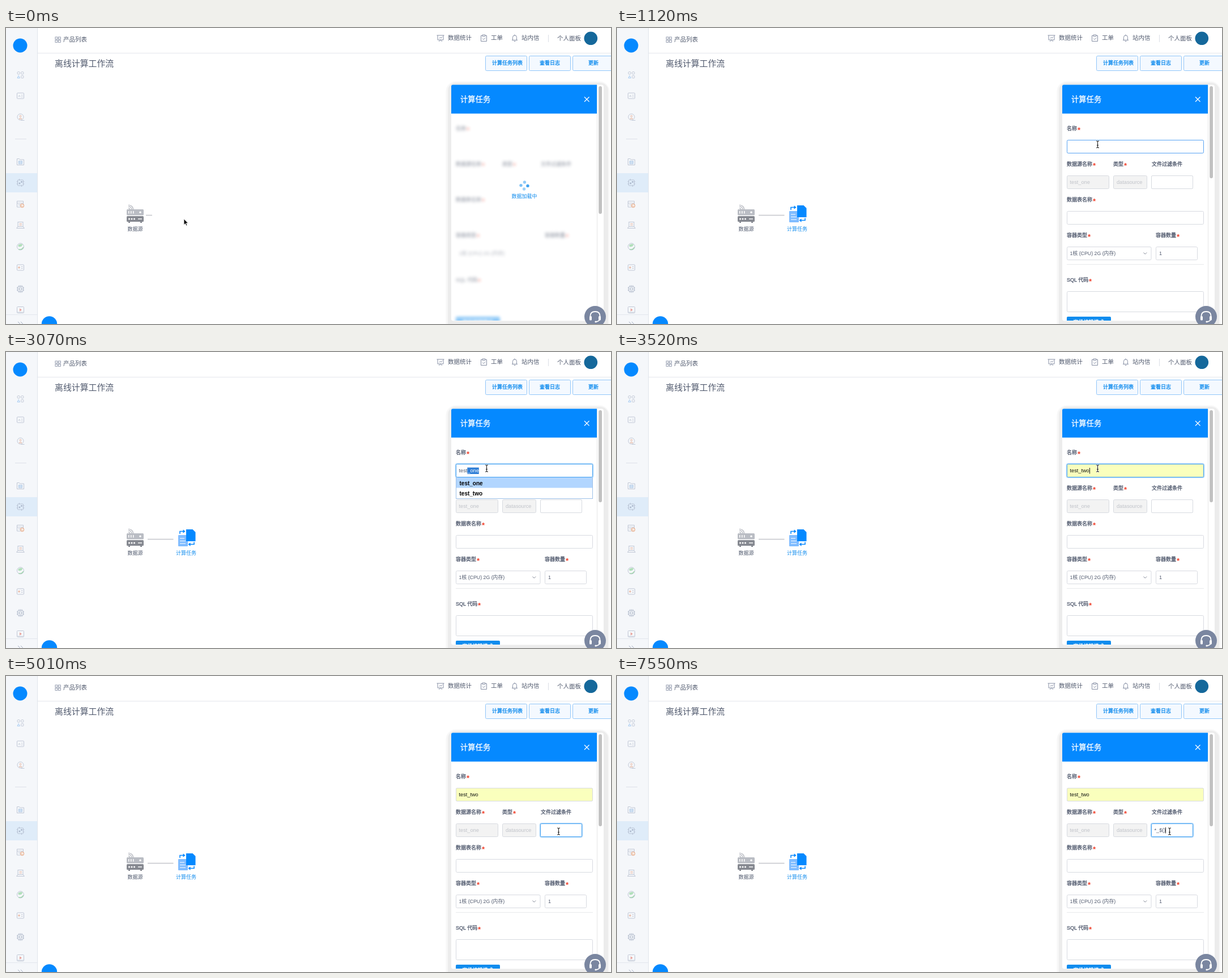
These frames come from a looping animation (1068x524 px, 8000 ms). An HTML page:

```html
<!DOCTYPE html>
<html lang="zh-CN">
<head>
<meta charset="utf-8">
<title>离线计算工作流</title>
<style>
html, body { margin: 0; width: 100%; height: 100%; overflow: hidden; background: #fff; }
svg { display: block; width: 1068px; height: 524px; }
text { font-family: 'Liberation Sans', 'Noto Sans CJK SC', 'Noto Sans CJK', sans-serif; white-space: pre; }
</style>
</head>
<body>
<svg id="stage" viewBox="0 0 1068 524"></svg>
<script>
const LOOP = 8000;
const BLUE = '#0589ff', GREY = '#a4aec2', INK = '#515a6e';

// Drawing helpers; text is placed by its left edge and vertical centre.
const rect = (x, y, w, h, fill, more = '') =>
  `<rect x="${x}" y="${y}" width="${w}" height="${h}" fill="${fill}" ${more}/>`;
const circle = (x, y, r, fill, more = '') =>
  `<circle cx="${x}" cy="${y}" r="${r}" fill="${fill}" ${more}/>`;
const line = (d, color = GREY, w = 1, more = '') =>
  `<path d="${d}" fill="none" stroke="${color}" stroke-width="${w}" ${more}/>`;
const text = (x, cy, size, str, fill = INK, more = '') =>
  `<text x="${x}" y="${cy + size * .37}" font-size="${size}" fill="${fill}" ${more}>${str}</text>`;
// A hairline outline gives the medium weight.
const medium = (x, cy, size, str, fill = INK) =>
  text(x, cy, size, str, fill, `stroke="${fill}" stroke-width=".3"`);
const group = (id, body, more = '') => `<g id="${id}" ${more}>${body}</g>`;
const at = (x, y, body) => `<g transform="translate(${x} ${y})">${body}</g>`;

const field = (x, y, w, h, fill = '#fff') =>
  rect(x + .5, y + .5, w - 1, h - 1, fill, 'rx="2" stroke="#d7dae0"');

function label(x, cy, str, width, required = true) {
  const star = `<text x="${x + width + 1}" y="${cy + 7.4}" font-size="13" font-weight="700" fill="#f0402c">*</text>`;
  return medium(x, cy, 9, str) + (required ? star : '');
}

function sidebar() {
  const box = (w, h, c = GREY) => rect(-w / 2, -h / 2, w, h, 'none', `rx="1" stroke="${c}"`);
  const icons = [
    [83, circle(-3.3, -3.3, 2.3, 'none', `stroke="${GREY}"`) + circle(3.3, -3.3, 2.3, 'none', `stroke="${GREY}"`) +
      line('M-5.5 5.5L-3.3 1.3L-1 5.5Z', '#7db4ee') + rect(1.2, 1.4, 4.2, 4.2, 'none', `rx="1" stroke="${GREY}"`)],
    [120, box(12, 10) + line('M-3.5 2L-2 -1L-.5 2M1.5 -1H4M1.5 2H4', GREY, .9)],
    [158, circle(0, -.5, 5.5, 'none', `stroke="${GREY}"`) + circle(0, -2, 1.4, 'none', 'stroke="#e39a7a"') +
      line('M-2.5 3Q0 -1 2.5 3Z', '#e39a7a') + line('M1 5.5H7')],
    [237, line('M-6 5.5V-5.5H-2L-1 -4H6V5.5Z') + rect(-3, -1.5, 6, 5, '#cfe2f6', 'stroke="#7fa9d6" stroke-width=".8"') + line('M-3 1H3', '#7fa9d6', .8)],
    [274, box(10, 10) + line('M-7 -2H-4M-7 2H-4M4 -2H7M4 2H7M-2 -7V-4M2 4V7') + circle(-1.5, 1, 1.4, '#8e9ab2') + circle(2, -1.5, 1.4, '#8e9ab2')],
    [312, line('M-6 -5.5H5V0M-6 -5.5V5H0M-6 -2H5M-4 1H0') + circle(3, 2.5, 3.3, '#f1c3a5', 'stroke="#e08c5e"') + line('M3 0V2.5H5.5', '#fff')],
    [349, rect(-4.5, -5.5, 9, 8, 'none', `stroke="${GREY}"`) + line('M-7 5.5H7M-5 2.5L-6.5 5.5M5 2.5L6.5 5.5') + line('M-2 -2.5H2.5M-2 0H2.5', '#e39a7a')],
    [387, circle(0, 0, 6, 'none', `stroke="${GREY}"`) + '<path d="M-4 -3Q0 -6 4 -4Q2 1 -1 0Q-4 2 -4 -3Z" fill="#8fd39b"/>' + line('M-3 5Q3 6 5 1', '#62bd73', 1.3)],
    [424, box(12, 10) + circle(-2.5, 0, 1.7, '#e39a7a') + line('M1.5 -1.5H4M1.5 1.5H4')],
    [462, box(9, 9, '#8e9ab2') + rect(-2, -2, 4, 4, 'none', 'stroke="#8e9ab2"') +
      line('M-2.5 -6.5V-4.5M0 -6.5V-4.5M2.5 -6.5V-4.5M-2.5 4.5V6.5M0 4.5V6.5M2.5 4.5V6.5M-6.5 -2.5H-4.5M-6.5 0H-4.5M-6.5 2.5H-4.5M4.5 -2.5H6.5M4.5 0H6.5M4.5 2.5H6.5', '#8e9ab2')],
    [499, box(12, 11) + '<path d="M-1.5 -2.7L2.5 0L-1.5 2.7Z" fill="#e4776b"/>' + line('M-6 4H6', GREY, .7)]
  ];
  return rect(0, 0, 55, 524, '#f5f7fa') + rect(0, 257, 55, 34, '#dfecf9') + rect(55, 0, 1, 524, '#e1e5ec') +
    circle(25, 31, 12.5, BLUE) + rect(16, 196, 20, 1, '#dde1e8') +
    group('icons', icons.map(([y, body]) => at(25.5, y, body)).join(''), 'opacity=".65"') +
    rect(0, 506, 55, 18, '#f5f7fa') + rect(0, 507, 55, 1, '#e3e7ed') +
    line('M21 520L24.5 523.5L21 527M26 520L29.5 523.5L26 527');
}

function header() {
  const c = '#8790a5', squares = [[87, 16], [92.5, 16], [87, 21.5], [92.5, 21.5]];
  const button = (x, tx, str) => rect(x + .5, 49.5, 73, 26, '#f4f9ff', 'rx="2" stroke="#91c6f9"') +
    medium(tx, 62, 9, str, '#108cee');
  return rect(56, 44, 1012, 1, '#e4e7ec') +
    squares.map(([x, y]) => rect(x, y, 3.8, 3.8, 'none', `stroke="${c}" stroke-width=".9"`)).join('') +
    text(101, 20.5, 10.5, '产品列表') +
    line('M760.5 13H773.5M762 13V21H772V13M764 24L767 21L770 24M764.5 18.5L766.5 16.5L768 18L770 15.5', c) +
    text(780, 17.5, 10.5, '数据统计') +
    line('M841 13.5H838.5V23.5H848.5V13.5H846M841 12H846V14.5H841ZM841 18.5L843 20.5L846.5 17', c) +
    text(856, 17.5, 10.5, '工单') +
    line('M893 21.5H903M894.5 21.5V16.5Q894.5 13 898 13T901.5 16.5V21.5M898 11.5V13M896.5 23.5H899.5', c) +
    text(910, 17.5, 10.5, '站内信') + rect(957, 12, 1, 13, '#dcdfe6') +
    text(973, 18.5, 10.5, '个人面板') + circle(1032.3, 18.3, 11.8, '#15689b') +
    text(86, 62, 14.9, '离线计算工作流') +
    button(846, 858, '计算任务列表') + button(923, 942, '查看日志') + button(1000, 1028, '更新');
}

function nodes() {
  const dark = '#868991', pale = '#babdc4';
  const source = line('M216 319Q219 319 219 322M216 316Q222 316.5 222 322M216 313.5Q224 314 224.5 321', '#a3a7b0', 1.1) +
    rect(213, 321, 30, 10.5, pale, 'rx="1.5"') + rect(213, 333, 30, 10, dark, 'rx="1.5"') +
    rect(216, 343, 3, 2, dark) + rect(237, 343, 3, 2, dark) +
    [216, 220, 224].map(x => rect(x, 324, 1.5, 4.5, '#fff')).join('') + circle(237, 326.3, 1.7, '#fff') +
    [217.5, 222, 226.5].map(x => circle(x, 338, 1.5, '#fff')).join('') + rect(233, 337.3, 7, 1.4, '#fff') +
    text(214.5, 356, 9, '数据源');
  const task = rect(304, 324, 17, 20, '#80bcff', 'rx="1"') + line('M307 330H315M307 334.5H317M307 339H317', '#fff', 1.2) +
    `<path d="M318 314H329.5L334.5 319V335H318Z" fill="${BLUE}"/>` +
    line('M307 322V317.5H314M332 336.5V340.5H324', BLUE, 1.6) +
    `<path d="M312.5 314.3L316.5 317.5L312.5 320.7ZM325.5 337.3L321.5 340.5L325.5 343.7Z" fill="${BLUE}"/>` +
    text(300, 356, 9, '计算任务', '#108cee');
  return source + line('', '#c3c5ca', 1.5, 'id="link"') + group('task', task);
}

function panel() {
  const labels = label(794, 178, '名称', 18) + label(794, 241, '数据源名称', 45) + label(876, 241, '类型', 18) +
    label(944, 241, '文件过滤条件', 54, false) + label(794, 304, '数据表名称', 45) + label(794, 367, '容器类型', 36) +
    label(951, 367, '容器数量', 36) + label(794, 446, 'SQL 代码', 38) +
    text(799.5, 398.5, 8.8, '1核 (CPU) 2G (内存)') +
    rect(794, 511, 78, 20, '#108cee', 'rx="2"') + medium(805.5, 520.5, 9, '高级编辑模式', '#fff');
  const fields = field(794, 198, 242, 24) + field(794, 261, 75, 24, '#f3f3f3') + field(876, 261, 60, 24, '#f3f3f3') +
    field(943, 261, 74, 24) + field(794, 324, 242, 24) + field(794, 387, 149.5, 24) + field(951, 387, 74, 24) +
    field(794, 466, 242, 37) + rect(794, 418, 242, 1, '#e8eaec') +
    text(799.5, 273, 9.2, 'test_one', '#c0c3c9') + text(882, 273, 9.2, 'datasource', '#c0c3c9') +
    text(957, 398.5, 9.2, '1') + line('M929.5 397.5L932.3 400.3L935.1 397.5', '#808695');
  const spinner = group('dots', [.45, .8, .4, .55].map((o, i) => {
    const a = i * Math.PI / 2 - 1.5;
    return circle(6 * Math.cos(a), 6 * Math.sin(a), 2.7, '#108cee', `opacity="${o}"`);
  }).join('')) + text(892.5, 297.5, 9, '数据加载中', '#108cee');

  return rect(776.5, 94.5, 289, 450, '#f7f7f7', 'rx="18"') + rect(780, 97, 283, 440, '#ececec', 'rx="14"') +
    rect(786, 100.5, 269, 418, '#fff', 'rx="4"') + rect(1043, 101, 1, 417, '#e6e6e6') +
    `<path d="M786 151.5V103.5Q786 100.5 789 100.5H1043V151.5Z" fill="${BLUE}"/>` +
    medium(802, 126.5, 13.3, '计算任务', '#fff') +
    line('M1021 122L1029.5 130.5M1029.5 122L1021 130.5', '#fff', 1.2) +
    rect(1046.2, 103, 5.8, 163, '#c1c1c1', 'id="thumb" rx="2.9"') +
    `<g clip-path="url(#body)">${group('fields', fields)}${group('labels', labels)}</g>` +
    group('live', '') + group('spin', spinner);
}

function support() {
  return circle(76.5, 524, 13.7, BLUE) + circle(1040, 511, 19, '#7a86a0') +
    line('M1031.5 514V510Q1031.5 502 1040 502T1048.5 510V514Q1048 519 1042 520', '#fff', 1.8) +
    rect(1030, 510, 4, 7.5, '#fff', 'rx="1.5"') + rect(1046, 510, 4, 7.5, '#fff', 'rx="1.5"') +
    circle(1041, 520, 1.6, '#fff');
}

const pointers =
  '<path id="arrow" d="M0 0V10.5L2.5 8.2L4.2 12L5.9 11.2L4.2 7.6H7.5Z" fill="#111" stroke="#fff" stroke-width=".7"/>' +
  group('beam', ['#fff', '#222'].map((c, i) =>
    line('M-2.5 -6Q0 -6 0 -4.5Q0 -6 2.5 -6M0 -4.5V4.5M-2.5 6Q0 6 0 4.5Q0 6 2.5 6M-1.5 1.5H1.5', c, i ? 1.1 : 2.4)).join(''));

const stage = document.getElementById('stage');
stage.innerHTML = `<defs><clipPath id="body">${rect(786, 152, 257, 366, '#000')}</clipPath></defs>` +
  rect(0, 0, 1068, 524, '#fff') + sidebar() + header() + nodes() + panel() + support() + group('pointer', pointers);
const $ = id => document.getElementById(id);
const show = (id, on) => $(id).setAttribute('display', on ? 'inline' : 'none');

// Advance widths in ems, so carets and selections follow the type.
const EM = { t: .278, e: .556, s: .5, _: .556, o: .556, n: .556, w: .722, '*': .389, $: .556, '(': .333, ')': .333 };
const measure = str => [...str].reduce((sum, ch) => sum + EM[ch] * 9.2, 0);

function input({ x, y, w, str = '', tail = '', caret, focus = 0, hover, fill = '#fff', ink = INK }) {
  const tx = x + 5.5, end = tx + measure(str);
  const border = focus ? '#40a0f2' : hover ? '#57a3f3' : '#d7dae0';
  let out = focus ? rect(x - .5, y - .5, w + 1, 25, 'none', `rx="3" stroke="#8fc8f8" stroke-width="1.6" opacity="${focus * .65}"`) : '';
  out += rect(x + .5, y + .5, w - 1, 23, fill, `rx="2" stroke="${border}"`);
  if (tail) out += rect(end, y + 6.5, measure(tail), 11.5, '#2f7ed6');
  out += text(tx, y + 12, 9.2, str, ink) + text(end, y + 12, 9.2, tail, '#fff');
  if (caret) out += rect(Math.round(end), y + 7, 1, 10.5, '#222');
  return out;
}

function menu(x, y, w, items, active) {
  return rect(x + .5, y + .5, w - 1, items.length * 18 + 1, '#fff', 'stroke="#9dc0e8"') +
    items.map((item, i) => (i === active ? rect(x + 1, y + i * 18, w - 2, 18.5, '#b2d6ff') : '') +
      text(x + 6.5, y + 10.3 + i * 18, 10, item, '#000', 'font-weight="700"')).join('');
}

const STEPS = [0, 150, 300, 450, 600, 750, 970, 1120, 3960, 4110, 4260, 4410, 4560, 4710];
const ease = p => p < .5 ? 2 * p * p : 1 - 2 * (1 - p) ** 2;
const tween = (t, a, b) => ease(Math.min(1, Math.max(0, (t - a) / (b - a))));
const latest = (list, t) => list.filter(([start]) => start <= t).pop()[1];

const NAME = [
  [0, {}], [1120, { hover: 1 }], [1420, { focus: .5 }], [1570, { focus: 1, caret: 1 }], [1870, { focus: 1 }],
  [2320, { focus: 1, str: 'tes', caret: 1, open: 1 }], [2470, { focus: 1, str: 'test', caret: 1, open: 1 }],
  [2920, { focus: 1, str: 'test', open: 1 }],
  [3070, { focus: 1, str: 'test', tail: '_one', open: 1, active: 0 }],
  [3220, { focus: 1, str: 'test', tail: '_two', open: 1, active: 1 }],
  [3370, { focus: 1, str: 'test_two', done: 1 }], [3520, { focus: 1, str: 'test_two', caret: 1, done: 1 }],
  [3960, { focus: 1, str: 'test_two', done: 1 }], [4560, { str: 'test_two', done: 1 }]
];
const FILTER = [
  [0, {}], [4410, { hover: 1 }], [4560, { focus: .5 }], [4710, { focus: 1, caret: 1 }], [5010, { focus: 1 }],
  [5460, { focus: 1, str: '*', caret: 1, open: 1 }], [5750, { focus: 1, str: '*_', caret: 1, open: 1 }],
  [6200, { focus: 1, str: '*_', open: 1 }], [6800, { focus: 1, str: '*_', caret: 1, open: 1 }],
  [7100, { focus: 1, str: '*_$', caret: 1, open: 1 }], [7550, { focus: 1, str: '*_$()', caret: 1 }]
];

function update(t) {
  const held = STEPS.filter(s => s <= t).pop();
  const loading = t < 450, name = latest(NAME, t), filter = latest(FILTER, t);

  $('link').setAttribute('d', t < 150 ? 'M247 331.5H258' : 'M250 331.5H295.5');
  show('task', t >= 150);
  $('thumb').setAttribute('height', loading ? 226 : 163);
  show('fields', !loading);
  show('spin', loading);
  $('labels').style.filter = loading ? 'blur(2.4px)' : 'none';
  $('labels').style.opacity = loading ? .45 : 1;
  $('dots').setAttribute('transform', `translate(915 279) rotate(${held * .3})`);

  let live = '';
  if (!loading) {
    live += input({ x: 794, y: 198, w: 242, ...name, fill: name.done ? '#faffbd' : '#fff', ink: name.done ? '#111' : INK });
    live += input({ x: 943, y: 261, w: 74, ...filter });
    if (name.open) live += menu(794, 222, 242, ['test_one', 'test_two'], name.active);
    if (filter.open) live += menu(943, 285, 74, ['*_$()']);
  }
  $('live').innerHTML = live;

  const go = tween(held, 150, 1120), down = tween(held, 3810, 4560);
  const x = 314 + 534.5 * go + 127 * down, y = 338 - 132 * go + 69 * down;
  show('arrow', held < 1120);
  show('beam', held >= 1120);
  $('pointer').setAttribute('transform', `translate(${x} ${y})`);
}

let start;
function tick(now) {
  start ??= now;
  update((now - start) % LOOP);
  requestAnimationFrame(tick);
}
update(0);
requestAnimationFrame(tick);
</script>
</body>
</html>
```
